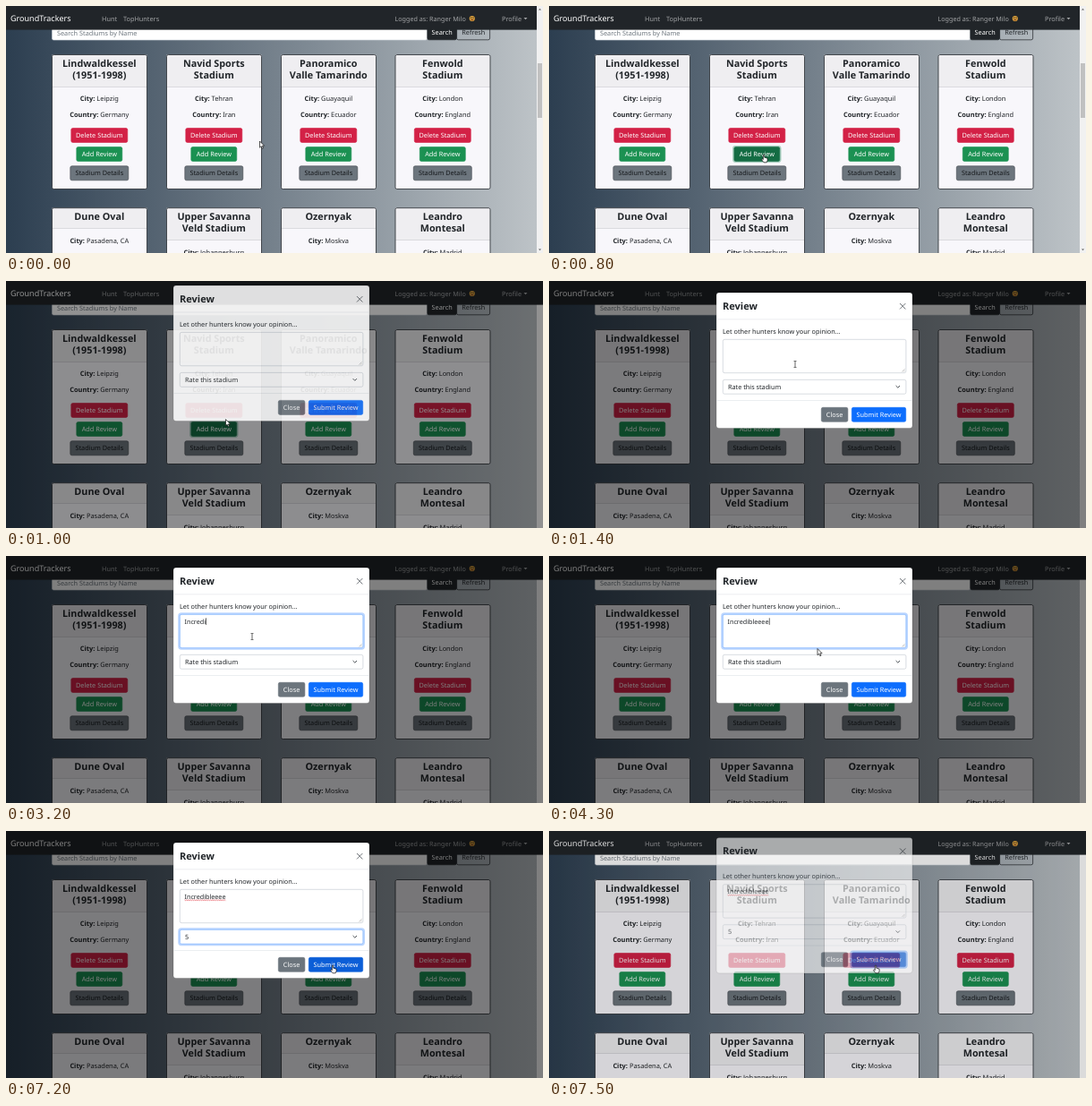
These frames come from a looping animation (600 px wide and 276 px high, 7600 ms). An HTML page with a canvas:

```html
<!DOCTYPE html>
<html lang="en">
<head>
<meta charset="utf-8">
<title>Stadium reviews</title>
<style>
html, body { margin: 0; width: 100%; height: 100%; overflow: hidden; background: #2c3e50; }
canvas { display: block; width: 600px; height: 276px; }
</style>
</head>
<body>
<canvas id="stage"></canvas>
<script>
const W = 600, H = 276, LOOP = 7600, STEP = 100, PAGE_W = 593;
const FONT = '"Noto Sans", "Open Sans", sans-serif';
const INK = '#212529';
const ratio = window.devicePixelRatio || 1;

function setup(canvas) {
  canvas.width = W * ratio;
  canvas.height = H * ratio;
  return canvas.getContext('2d');
}

const stage = setup(document.getElementById('stage'));
const layer = setup(document.createElement('canvas'));
let c = stage;

const CARD_X = [51.5, 179.5, 307.5, 435];
const ROWS = [
  { y: 54.5, cards: [
    [['Lindwaldkessel', '(1951-1998)'], 'Leipzig', 'Germany'],
    [['Navid Sports', 'Stadium'], 'Tehran', 'Iran'],
    [['Panoramico', 'Valle Tamarindo'], 'Guayaquil', 'Ecuador'],
    [['Fenwold', 'Stadium'], 'London', 'England']] },
  { y: 225.7, cards: [
    [['Dune Oval'], 'Pasadena, CA', 'USA'],
    [['Upper Savanna', 'Veld Stadium'], 'Johannesburg', 'South Africa'],
    [['Ozernyak'], 'Moskva', 'Russia'],
    [['Leandro', 'Montesal'], 'Madrid', 'Spain']] }
];

// time, x, y
const PATH = [
  [0, 283.5, 151], [200, 283.5, 151], [700, 240, 166], [900, 240, 166],
  [1300, 275, 93], [1700, 275, 93], [2200, 275, 90], [4000, 275, 90],
  [4300, 300, 103.5], [4700, 302, 117], [5100, 302, 117],
  [5700, 274, 168], [6500, 274, 168], [7100, 365, 150], [7600, 365, 150]
];

const clamp = v => Math.max(0, Math.min(1, v));
const easeOut = v => 1 - Math.pow(1 - clamp(v), 1.8);

function pointer(t) {
  let i = 0;
  while (i < PATH.length - 2 && PATH[i + 1][0] <= t) i++;
  const [t0, x0, y0] = PATH[i], [t1, x1, y1] = PATH[i + 1];
  const p = clamp((t - t0) / (t1 - t0)), s = p * p * (3 - 2 * p);
  return [x0 + (x1 - x0) * s, y0 + (y1 - y0) * s];
}

function text(str, x, y, color = INK, size = 7.3, weight = 400, align = 'left') {
  c.font = `${weight} ${size}px ${FONT}`;
  c.textAlign = align;
  c.fillStyle = color;
  c.fillText(str, x, y);
}

function rect(x, y, w, h, color) {
  c.fillStyle = color;
  c.fillRect(x, y, w, h);
}

function box(x, y, w, h, r, fill, stroke, line = 0.6) {
  c.beginPath();
  c.roundRect(x, y, w, h, r);
  if (fill) { c.fillStyle = fill; c.fill(); }
  if (stroke) { c.strokeStyle = stroke; c.lineWidth = line; c.stroke(); }
}

function poly(points, fill, stroke, line = 0.7, close = true) {
  c.beginPath();
  points.forEach(([x, y]) => c.lineTo(x, y));
  if (close) c.closePath();
  if (fill) { c.fillStyle = fill; c.fill(); }
  if (stroke) { c.strokeStyle = stroke; c.lineWidth = line; c.stroke(); }
}

function button(label, x, y, w, h, fill, color = '#fff', edge = fill) {
  box(x, y, w, h, 1.8, fill, edge);
  text(label, x + w / 2, y + h / 2 + 2.6, color, 7.3, 400, 'center');
}

function field(x, y, w, h, focused) {
  if (focused) box(x - 1, y - 1, w + 2, h + 2, 2.6, null, 'rgba(13,110,253,.28)', 2.2);
  box(x, y, w, h, 1.8, '#fff', focused ? '#86b7fe' : '#ced4da', 0.8);
}

function fact(label, value, mid, y) {
  const size = 7.45;
  c.font = `700 ${size}px ${FONT}`;
  const a = c.measureText(label + ' ').width;
  c.font = `400 ${size}px ${FONT}`;
  const x = mid - (a + c.measureText(value).width) / 2;
  text(label, x, y, INK, size, 700);
  text(value, x + a, y, INK, size);
}

function card(x, y, [title, city, country], active) {
  const w = 106, mid = x + w / 2 - 0.2, head = title.length > 1 ? 35.5 : 22.5;
  box(x, y, w, 150, 1.8, '#f8f7fb');
  rect(x, y, w, head, '#efeef1');
  rect(x, y + head, w, 0.6, '#c9c9cd');
  box(x, y, w, 150, 1.8, null, '#34383e', 0.9);
  title.forEach((line, i) => text(line, mid, y + 13.4 + i * 13, INK, 10.8, 600, 'center'));
  fact('City:', city, mid, y + head + 16.3);
  fact('Country:', country, mid, y + head + 34.3);
  const b = y + head + 46.5;
  button('Delete Stadium', mid - 31.5, b, 63, 16, '#d32146');
  if (active) box(mid - 26.5, b + 20.3, 53, 17.4, 2.4, null, 'rgba(25,135,84,.35)', 1.4);
  button('Add Review', mid - 25.5, b + 21, 51, 16, active ? '#146c43' : '#1b9152');
  button('Stadium Details', mid - 32.5, b + 42.3, 65, 16, '#6c757d', '#15181b', '#40464c');
}

function navbar() {
  rect(0, 0, W, 26.6, INK);
  const dim = 'rgba(255,255,255,.58)';
  text('GroundTrackers', 5, 17, '#fff', 9, 500);
  text('Hunt', 107, 16.6, dim);
  text('TopHunters', 131, 16.6, dim);
  text('Logged as: Ranger Milo', 434.5, 16.6, dim, 7.2);
  c.beginPath();
  c.arc(520.8, 14, 3.1, 0, 7);
  c.fillStyle = '#d9a03c';
  c.fill();
  rect(519.1, 12.6, 1.1, 1.3, '#3c2a18');
  rect(521.4, 12.6, 1.1, 1.3, '#3c2a18');
  rect(519.4, 15, 2.8, 1.1, '#7a3a20');
  text('Profile', 554, 16.6, dim);
  poly([[578.5, 13], [582.5, 13], [580.5, 15.2]], dim);
}

function page(t, modal) {
  rect(0, 0, W, H, '#fff');
  const g = c.createLinearGradient(0, 0, PAGE_W, 0);
  g.addColorStop(0, '#2c3e50');
  g.addColorStop(1, '#bdc3c7');
  rect(0, 0, PAGE_W, H, g);

  box(51.5, 18, 419, 20, 1.8, '#fff', '#ced4da');
  text('Search Stadiums by Name', 57, 32.6, '#6c757d');
  button('Search', 470.8, 21.5, 32.6, 16.3, INK);
  box(503.6, 21.5, 37, 16.3, 1.8, null, INK, 0.7);
  text('Refresh', 522.3, 32.4, INK, 7.3, 400, 'center');

  const active = t >= 700 && t < 1400;
  ROWS.forEach((row, r) => row.cards.forEach((data, i) =>
    card(CARD_X[i], row.y, data, active && r === 0 && i === 1)));
  navbar();

  if (!modal) {
    rect(PAGE_W, 0, 7, H, '#f1f1f1');
    rect(594, 64, 5, 61, '#c1c1c1');
    poly([[595, 4.5], [598, 4.5], [596.5, 2.7]], '#606060');
    poly([[595, 271.5], [598, 271.5], [596.5, 273.3]], '#606060');
  }
}

function squiggle(x0, x1, y) {
  const points = [];
  for (let x = x0, i = 0; x <= x1; x += 0.9, i++) points.push([x, y + (i % 2 ? 0.4 : -0.4)]);
  poly(points, null, '#e0323c', 0.6, false);
}

function dialog(t) {
  box(187, 13, 219, 151.5, 3, '#fff', 'rgba(0,0,0,.25)');
  text('Review', 194, 31.8, INK, 11, 600);
  poly([[392, 25], [398.4, 31.4]], null, '#70757a', 1, false);
  poly([[398.4, 25], [392, 31.4]], null, '#70757a', 1, false);
  rect(187.3, 42.6, 218.4, 0.6, '#dee2e6');
  text('Let other hunters know your opinion...', 194, 58.6);

  const typing = t >= 1900 && t < 5000;
  field(194.3, 65.3, 204.6, 37.4, typing);
  const count = t < 2350 ? 0 : 1 + Math.floor((t - 2350) / 135);
  const word = 'Incredibleeee'.slice(0, count);
  text(word, 199.5, 75.6, INK, 7.2);
  const end = 199.5 + c.measureText(word).width;
  const blink = t < 2350 || t > 4000 ? t % 1000 < 500 : true;
  if (typing && blink) rect(end + 0.4, 69.3, 0.6, 7.6, '#000');
  if (t >= 5000) squiggle(199.5, end, 77.3);
  poly([[394.5, 101.5], [397.6, 98.4]], null, '#888', 0.5, false);
  poly([[396.4, 101.5], [397.6, 100.3]], null, '#888', 0.5, false);

  field(194.3, 110.3, 204.6, 15.9, t >= 5000 && t < 7300);
  text(t >= 6100 ? '5' : 'Rate this stadium', 200, 120.9, INK, 7.25);
  poly([[387.6, 117], [389.8, 119.2], [392, 117]], null, '#343a40', 0.9, false);

  rect(187.3, 133.3, 218.4, 0.6, '#dee2e6');
  button('Close', 304.3, 141.3, 29.6, 16, '#6c757d');
  const over = t >= 6900, pressed = t >= 7300;
  if (pressed) box(337.3, 140.3, 62.4, 18, 2.6, null, 'rgba(49,132,253,.5)', 2.2);
  button('Submit Review', 338.3, 141.3, 60.4, 16, over ? '#0b5ed7' : '#0d6efd');
}

// The dialog fades as one group, so it is painted on its own layer first.
function fadeDialog(t, alpha, shift) {
  c = layer;
  start();
  c.clearRect(0, 0, W, H);
  c.translate(0, shift);
  dialog(t);
  c = stage;
  c.globalAlpha = alpha;
  c.drawImage(layer.canvas, 0, 0, W, H);
  c.globalAlpha = 1;
}

function arrow(x, y) {
  poly([[0, 0], [0, 7.2], [1.7, 5.7], [2.8, 8.2], [4, 7.7], [2.9, 5.3], [5.1, 5.2]]
    .map(([a, b]) => [x + a, y + b]), '#fff', '#111');
}

function hand(x, y) {
  poly([[-0.7, 0.2], [0.6, 0.2], [0.8, 3.2], [3.9, 4], [4.2, 6.2], [3.2, 8.8], [0, 8.8],
    [-2.5, 5.7], [-1.8, 4.8], [-0.7, 5.6]]
    .map(([a, b]) => [x + a, y + b]), '#fff', '#111');
}

function beam(x, y) {
  rect(x - 0.35, y - 3.4, 0.7, 6.8, '#222');
  rect(x - 1.5, y - 3.7, 3, 0.6, '#222');
  rect(x - 1.5, y + 3.1, 3, 0.6, '#222');
}

function start() {
  c.setTransform(ratio, 0, 0, ratio, 0, 0);
  c.textRendering = 'geometricPrecision';
}

function draw(t) {
  start();
  const modal = t >= 900;
  page(t, modal);

  if (modal) {
    const age = t - 870, out = t - 7455;
    let alpha = clamp(age / 150), shade = 0.5 * alpha;
    let shift = -22 * (1 - easeOut(age / 300));
    if (out > 0) {
      alpha = 1 - clamp(out / 120);
      shade = 0.14;
      shift = -22 * easeOut(out / 300);
    }
    rect(0, 0, W, H, `rgba(0,0,0,${shade})`);
    fadeDialog(t, alpha, shift);
  }

  const [x, y] = pointer(t);
  const inText = t >= 1100 && y > 65 && y < 103;
  const onButton = (t >= 600 && t < 1000) || t >= 6900;
  (inText ? beam : onButton ? hand : arrow)(x, y);
}

function tick() {
  const t = performance.now() % LOOP;
  draw(Math.floor(t / STEP) * STEP);
  requestAnimationFrame(tick);
}
tick();
</script>
</body>
</html>
```
